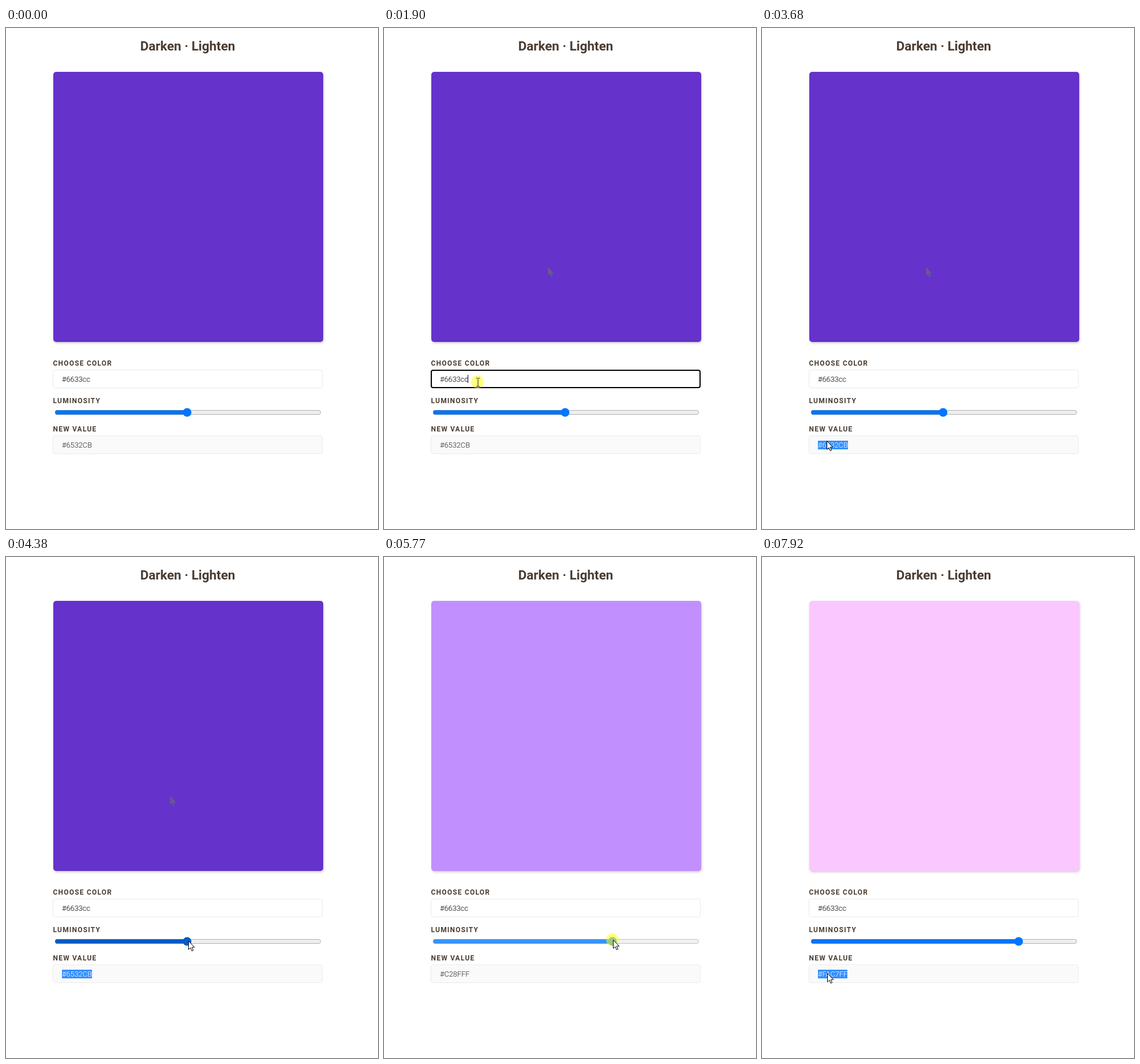
These frames come from a looping animation (645x868 px, 8000 ms). An HTML page:

```html
<!DOCTYPE html>
<html lang="en">
<head>
<meta charset="utf-8">
<title>Darken · Lighten</title>
<style>
  html, body { margin: 0; width: 100%; height: 100%; overflow: hidden; background: #fff; }
  body { position: relative; font-family: Roboto, sans-serif; color: #4a3c31; }
  h1, label, svg, input, .swatch, .field, .value { position: absolute; box-sizing: border-box; margin: 0; white-space: pre; }
  h1 { top: 18px; left: 0; width: 630px; text-align: center; font: 700 22.4px/26px Roboto, sans-serif; }
  label { left: 81.5px; font-size: 12px; font-weight: 700; line-height: 14px; letter-spacing: 1.2px; }
  .swatch { left: 82px; top: 76px; width: 467.5px; height: 467.5px; border-radius: 5px;
    box-shadow: 1px 2px 4px rgba(0, 0, 0, .2); }
  .field { left: 81px; width: 468px; height: 32px; border: 1px solid #ebebeb; border-radius: 4px; }
  .field.focus { border: 2px solid #000; }
  .value { left: 97px; font-size: 12.8px; font-weight: 300; line-height: 15px; color: #000; }
  .value mark { background: #338fff; color: #fff; }
  input { left: 83.6px; top: 658px; width: 463.2px; height: 16px; pointer-events: none; }
  input.hover { accent-color: #005cc8; }
  input.active { opacity: .78; }
  svg { left: 0; top: 0; }
</style>
</head>
<body>
<h1>Darken · Lighten</h1>
<div class="swatch" id="swatch"></div>
<label style="top:574px">CHOOSE COLOR</label>
<div class="field" id="chooser" style="top:592px"></div>
<div class="value" id="chosen" style="top:601px"></div>
<label style="top:639px">LUMINOSITY</label>
<input id="slider" type="range" min="-255" max="255" value="0" tabindex="-1">
<label style="top:688px">NEW VALUE</label>
<div class="field" style="top:706px;background:#fafafa"></div>
<div class="value" id="result" style="top:715px;color:#222"></div>

<svg width="645" height="868">
  <defs>
    <path id="arrowShape" d="M.5 .5V15.2L3.9 12 6.2 17.5 8.6 16.5 6.3 11.2H10.8Z"/>
  </defs>
  <use id="ghost" href="#arrowShape" x="284" y="414" fill="#685a8c"/>
  <rect id="caret" x="145" y="601" width="1" height="14"/>
  <g id="pointer">
    <circle id="halo" cx="-1" r="11" fill="#ff0" opacity=".5"/>
    <use id="arrow" href="#arrowShape" fill="#fff" stroke="#000"/>
    <path id="beam" d="M-3 -6.5H-1L0 -5.5 1 -6.5H3M0 -5.5V7M-3 8H-1L0 7 1 8H3" fill="none" stroke="#222"/>
  </g>
</svg>

<script>
const LOOP = 8000, START = 200, TICK = 77;
const COLOR = '#6633cc';
const DRAG = true;

// Pointer stops: tick, x, y, button held on the way there
const STOPS = [
  [0, 570, 856],
  [10, 250, 378],
  [21, 169, 613],
  [27, 92, 612, DRAG],        // select the chosen color
  [33, 230, 724],
  [38, 180, 723],
  [43, 92, 720, DRAG],        // select the new value
  [54, 316, 665],
  [57, 316, 664],
  [61, 317, 664, DRAG],       // press the thumb
  [80, 446, 663, DRAG],       // lighten
  [83, 393, 680],
  [88, 150, 723],
  [92, 96, 723, DRAG],        // select the lightened value
  [100, 113, 721]
];

const $ = id => document.getElementById(id);
const clamp = (v, lo, hi) => Math.max(lo, Math.min(hi, v));
const within = (v, lo, hi) => v >= lo && v <= hi;
const smooth = k => k * k * (3 - 2 * k);
const show = (id, on) => { $(id).style.display = on ? '' : 'none'; };

function pointerAt(tick) {
  const next = STOPS.findIndex(stop => stop[0] >= tick);
  const i = next < 0 ? STOPS.length - 1 : Math.max(next, 1);
  const [t0, x0, y0] = STOPS[i - 1], [t1, x1, y1, held] = STOPS[i];
  const k = smooth(clamp((tick - t0) / (t1 - t0), 0, 1));
  return { x: x0 + (x1 - x0) * k, y: y0 + (y1 - y0) * k, held };
}

// Index of the first selected character while dragging leftwards
function selectionStart(tick, dragEnd) {
  const { x } = pointerAt(Math.min(tick, dragEnd));
  return clamp(Math.round((x - 97) / 7), 0, COLOR.length);
}

function setValue(id, text, from) {
  const selected = text.slice(from);
  $(id).innerHTML = text.slice(0, from) + (selected && `<mark>${selected}</mark>`);
}

function lighten(color, shift) {
  return color.replace(/\w\w/g, pair =>
    clamp(parseInt(pair, 16) + shift, 0, 255).toString(16).padStart(2, '0').toUpperCase());
}

function render(time) {
  const tick = Math.floor((time - START) / TICK);
  const { x, y, held } = pointerAt(tick);
  const inRow = within(x, 82, 549);
  const overText = inRow && within(y, 593, 624);
  const overSlider = inRow && within(y, 657, 674);

  const thumbX = pointerAt(clamp(tick, 57, 80)).x;
  const shift = Math.round((thumbX - 316.5) * 255 / 223);
  const light = lighten(COLOR, shift);
  $('swatch').style.background = light;
  $('slider').value = shift;
  $('slider').className = overSlider ? (held ? 'active' : 'hover') : '';

  const focused = within(tick, 22, 39);
  const chosenFrom = focused ? selectionStart(tick, 27) : COLOR.length;
  const resultFrom = within(tick, 39, 57) ? selectionStart(tick, 43)
    : tick > 88 ? selectionStart(tick, 92) : COLOR.length;
  $('chooser').classList.toggle('focus', focused);
  setValue('chosen', COLOR, chosenFrom);
  setValue('result', light, resultFrom);
  show('caret', focused && chosenFrom === COLOR.length);

  show('ghost', within(tick, 8, 60));
  show('pointer', tick >= 0);
  show('halo', held);
  show('arrow', !overText);
  show('beam', overText);
  $('pointer').setAttribute('transform', `translate(${Math.round(x)} ${Math.round(y)})`);
}

const begin = performance.now();
function loop() {
  render((performance.now() - begin) % LOOP);
  requestAnimationFrame(loop);
}
loop();
</script>
</body>
</html>
```
